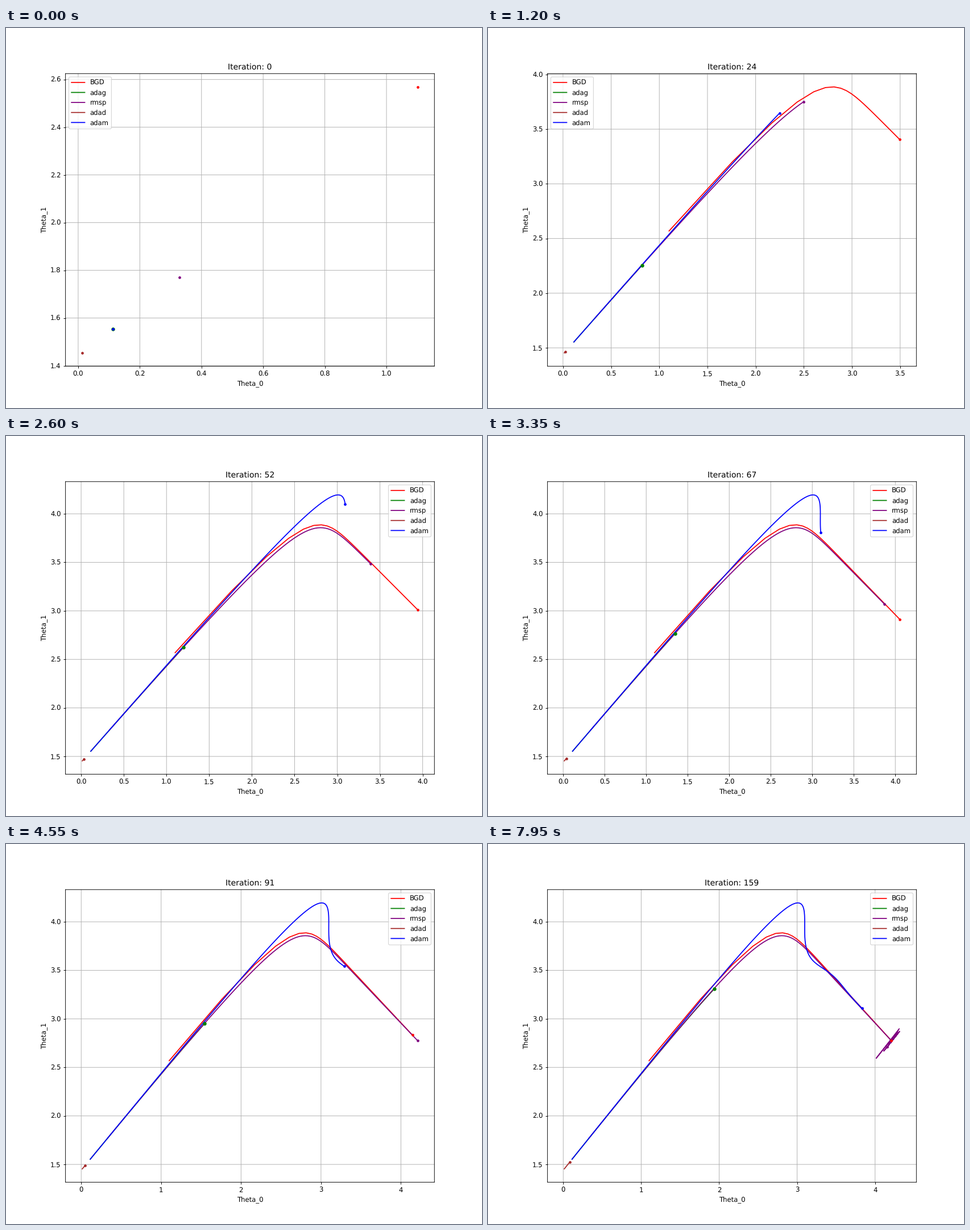
A matplotlib script for the animation above (8000 ms loop, 837x669 px).

```python
import numpy as np
import matplotlib.pyplot as plt
from matplotlib.animation import FuncAnimation

W, H, DPI = 837, 669, 84
STEPS, INTERVAL = 160, 50
RATE, RHO, EPS = 0.1, 0.9, 1e-8

# Soft, unsnapped lines and text
plt.rcParams["path.snap"] = False
plt.rcParams["text.hinting"] = "none"

# Noisy straight line y = 4 + 3x, fitted by least squares
np.random.seed(42)
M = 100
x = 2 * np.random.rand(M, 1)
y = 4 + 3 * x + np.random.randn(M, 1)
A = np.c_[np.ones((M, 1)), x]
START = np.random.randn(2, 1)


def gradient(theta):
    return 2 / M * A.T.dot(A.dot(theta) - y)


def descend(rule):
    """Follow one update rule and return the visited points."""
    theta, path = START.copy(), []
    state = [np.zeros((2, 1)), np.zeros((2, 1))]
    for t in range(1, STEPS + 1):
        theta = theta - rule(gradient(theta), state, t)
        path.append(theta.ravel())
    return np.array(path)


def bgd(g, s, t):
    return RATE * g


def adagrad(g, s, t):
    s[0] = s[0] + g**2
    return RATE * g / np.sqrt(s[0] + EPS)


def rmsprop(g, s, t):
    s[0] = RHO * s[0] + (1 - RHO) * g**2
    return RATE * g / np.sqrt(s[0] + EPS)


def adadelta(g, s, t):
    s[0] = RHO * s[0] + (1 - RHO) * g**2
    step = np.sqrt(s[1] + EPS) / np.sqrt(s[0] + EPS) * g
    s[1] = RHO * s[1] + (1 - RHO) * step**2
    return step


def adam(g, s, t, b1=0.9, b2=0.999):
    s[0] = b1 * s[0] + (1 - b1) * g
    s[1] = b2 * s[1] + (1 - b2) * g**2
    m, v = s[0] / (1 - b1**t), s[1] / (1 - b2**t)
    return RATE * m / (np.sqrt(v) + EPS)


METHODS = [
    ("BGD", bgd, "red", 3),
    ("adag", adagrad, "green", 4.5),
    ("rmsp", rmsprop, "purple", 3),
    ("adad", adadelta, "brown", 3),
    ("adam", adam, "blue", 3),
]

fig, ax = plt.subplots(figsize=((W + 1e-6) / DPI, (H + 1e-6) / DPI), dpi=DPI)
ax.set_xlabel("Theta_0")
ax.set_ylabel("Theta_1")
ax.grid(True)

tracks = []
for label, rule, color, size in METHODS:
    line, = ax.plot([], [], color=color, label=label)
    dot, = ax.plot([], [], "o", color=color, markersize=size, zorder=3)
    tracks.append((descend(rule), line, dot))
ax.legend(loc="best", labelspacing=0.515)


def update(i):
    for path, line, dot in tracks:
        line.set_data(path[:i + 1, 0], path[:i + 1, 1])
        dot.set_data(path[i:i + 1, 0], path[i:i + 1, 1])
    ax.relim()
    ax.autoscale_view()
    ax.set_title(f"Iteration: {i}")
    return []


anim = FuncAnimation(fig, update, frames=STEPS, interval=INTERVAL,
                     init_func=lambda: update(0), repeat=True,
                     repeat_delay=0, blit=False)
plt.show()
```
